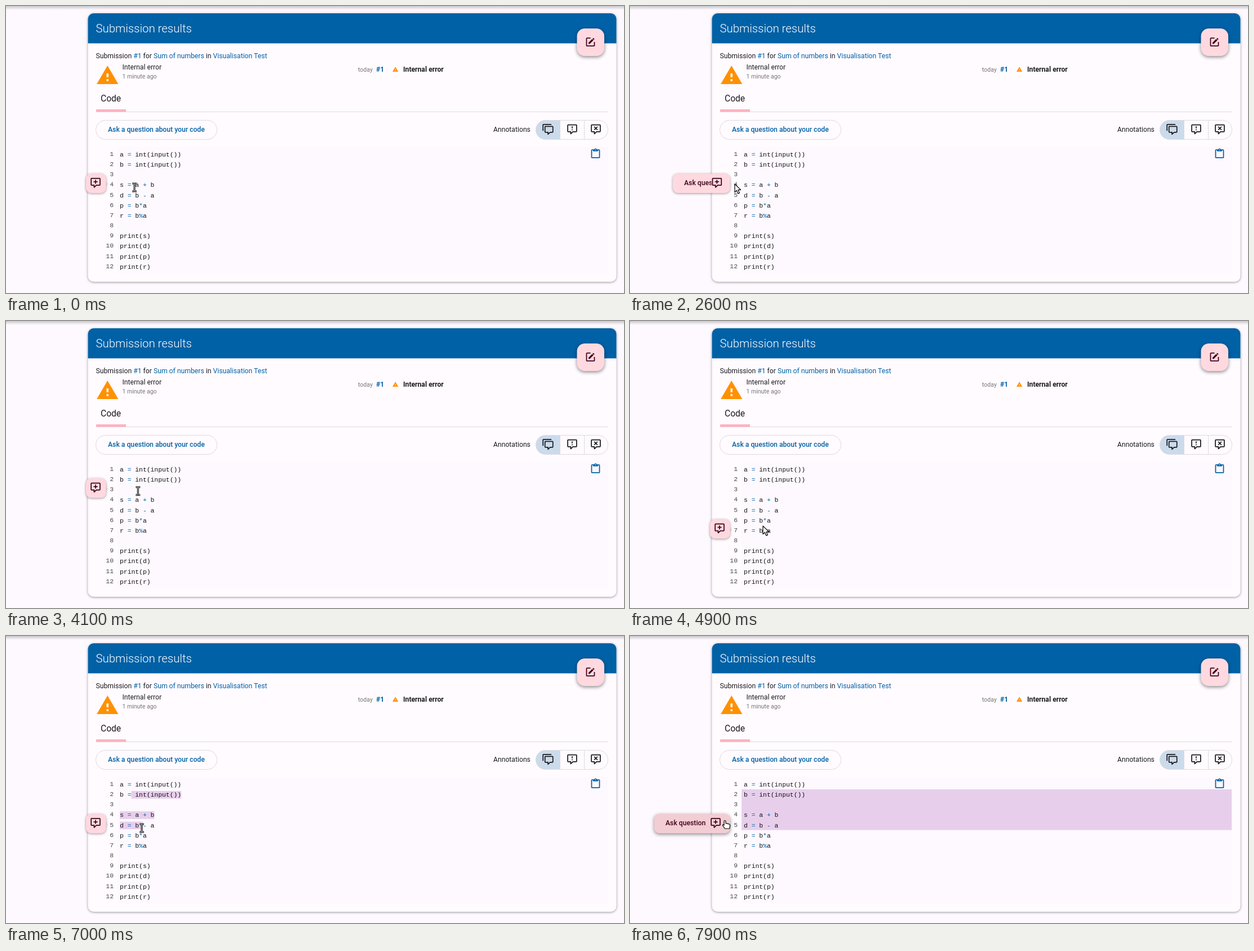
Recreate the animation shown at these times as an HTML page. Size 1097x511 px, loop 8 s.

```html
<!DOCTYPE html>
<html lang="en">
<head>
<meta charset="utf-8">
<title>Submission results</title>
<style>
  html, body { margin: 0; width: 1097px; height: 511px; overflow: hidden; background: #fdf9ff; }
  svg { display: block; }
  text { font: 12.2px Roboto, sans-serif; fill: #1b1b1f; white-space: pre; }
  .title { font-size: 20.4px; font-weight: 300; fill: #fff; }
  .tab { font-size: 15.6px; }
  .small { font-size: 10.5px; fill: #77767a; }
  .link { fill: #0061a6; }
  .medium { font-weight: 500; }
  .bold { font-weight: 700; }
  .code text { font: 11.375px "Liberation Mono", monospace; fill: #111; }
  .code .number { fill: #44474e; text-anchor: end; }
  .outline { fill: none; stroke: #dddae0; }
  .raised { filter: drop-shadow(0 1px 2px #0006); }
  .floating { filter: drop-shadow(0 2px 3px #0007); }
  .maroon { fill: #3f0018; }
  .mark { fill: #e7cfec; }
</style>
</head>
<body>
<svg width="1097" height="511" viewBox="0 0 1097 511">
  <defs>
    <linearGradient id="navShadow" x2="0" y2="1">
      <stop stop-color="#000" stop-opacity=".2"/>
      <stop offset="1" stop-color="#000" stop-opacity="0"/>
    </linearGradient>
    <path id="bubble" d="M9 22a1 1 0 0 1-1-1v-3H4a2 2 0 0 1-2-2V4a2 2 0 0 1 2-2h16a2 2 0 0 1 2 2v12a2 2 0 0 1-2 2h-6.1l-3.7 3.7q-.3.3-.7.3zM10 16v3.1l3.1-3.1H20V4H4v12z"/>
    <path id="warning" fill="#ff9100" d="M13 14h-2v-4h2m0 8h-2v-2h2M1 21h22L12 2z"/>
    <path id="beamShape" d="M-4-7h2.5L0-6l1.5-1H4M-4 7h2.5L0 6l1.5 1H4M0-6V6"/>
  </defs>

  <rect width="1097" height="7" fill="url(#navShadow)"/>
  <rect class="raised" x="145.5" y="13" width="938" height="478" rx="10" fill="#fffbff"/>
  <path fill="#0061a6" d="M145.5 66.5V23a10 10 0 0 1 10-10h918a10 10 0 0 1 10 10v43.5z"/>
  <text class="title" x="159.5" y="47">Submission results</text>

  <rect class="floating" x="1013.5" y="40" width="48.5" height="49" rx="14" fill="#ffd9df"/>
  <path class="maroon" transform="translate(1027 53.5) scale(.875)" d="M5 3a2 2 0 0 0-2 2v14a2 2 0 0 0 2 2h14a2 2 0 0 0 2-2v-7h-2v7H5V5h7V3zm12.8 1q-.3 0-.5.2l-1.2 1.2 2.5 2.5 1.2-1.2q.4-.5 0-1l-1.5-1.5q-.2-.2-.5-.2m-2.4 2.1L8 13.5V16h2.5l7.4-7.4z"/>

  <text x="159.5" y="92.5">Submission <tspan class="link">#1</tspan> for <tspan class="link">Sum of numbers</tspan> in <tspan class="link">Visualisation Test</tspan></text>
  <use href="#warning" transform="translate(159.3 102.5) scale(1.74)"/>
  <text x="206.5" y="113">Internal error</text>
  <text class="small" x="206.5" y="129">1 minute ago</text>
  <text class="small" x="625" y="116.7">today</text>
  <text class="link bold" x="657" y="117">#1</text>
  <use href="#warning" transform="translate(685.6 107.2) scale(.47)"/>
  <text class="bold" x="705" y="117">Internal error</text>

  <text class="tab" x="168" y="170">Code</text>
  <path class="outline" d="M160 188.5h909"/>
  <path fill="#ffb1c1" d="M160 184h53v4.5h-53z"/>

  <rect class="outline" x="159.5" y="203.5" width="215" height="34" rx="17"/>
  <text class="link medium" x="181" y="224">Ask a question about your code</text>
  <text x="865" y="224">Annotations</text>
  <path fill="#cbdbec" d="M983 203.5h-25.5a17 17 0 0 0 0 34H983z"/>
  <rect class="outline" x="940.5" y="203.5" width="128" height="34" rx="17"/>
  <path class="outline" d="M983.5 204v33m43-33v33"/>
  <g fill="#1b1b1f">
    <path transform="translate(951.5 209) scale(.875)" d="M12 23a1 1 0 0 1-1-1v-3H7a2 2 0 0 1-2-2V7a2 2 0 0 1 2-2h14a2 2 0 0 1 2 2v10a2 2 0 0 1-2 2h-4.1l-3.7 3.7q-.3.3-.7.3zM13 17v3.1l3.1-3.1H21V7H7v10zM3 15H1V3a2 2 0 0 1 2-2h16v2H3z"/>
    <g transform="translate(994.5 209) scale(.875)"><use href="#bubble"/><path d="M11 6h2v4h-2zm0 6h2v2h-2z"/></g>
    <g transform="translate(1036.5 209) scale(.875)"><use href="#bubble"/><path d="M9.4 6 12 8.6 14.6 6 16 7.4 13.4 10l2.6 2.6-1.4 1.4-2.6-2.6L9.4 14 8 12.6l2.6-2.6L8 7.4z"/></g>
  </g>

  <rect x="198" y="251" width="871" height="225" fill="#fdf9fe"/>
  <path id="marks" class="mark"/>
  <path class="link" transform="translate(1036 252.6) scale(.875)" d="M19 3h-4.2a3 3 0 0 0-5.6 0H5a2 2 0 0 0-2 2v14a2 2 0 0 0 2 2h14a2 2 0 0 0 2-2V5a2 2 0 0 0-2-2m-7 0a1 1 0 0 1 0 2 1 1 0 0 1 0-2M7 7h10V5h2v14H5V5h2z"/>
  <g id="code" class="code"></g>

  <g id="ask">
    <path id="tail" fill="#ffe3e8" d="M176-4l5.5 6-5.5 6z"/>
    <rect id="pill" y="-16.5" height="34.5" rx="9"/>
    <svg id="label" y="-12" height="24"><text class="maroon medium" x="0" y="16">Ask question</text></svg>
    <g id="plus" class="maroon"><use href="#bubble"/><path d="M11 6h2v3h3v2h-3v3h-2v-3H8V9h3z"/></g>
  </g>

  <g id="cursor" stroke="#000" stroke-width="1.2" stroke-linejoin="round" fill="#fff">
    <g id="beam" fill="none">
      <use href="#beamShape" stroke-width="3"/>
      <use href="#beamShape" stroke-width=".9" stroke="#fff"/>
    </g>
    <path id="arrow" d="M0 0v14.5l3.4-3.1 2.4 5.7 2.6-1.1L6 10.4h4.6z"/>
    <path id="hand" d="M-4-6a1.5 1.5 0 0 1 3 0v3.6h1.2l4.8 1.2q1.6.5 1.5 2V3l-1 4h-8L-6.2 1.6q-.8-1.6.6-1.8L-4 .9z"/>
  </g>
</svg>
<script>
const $ = id => document.getElementById(id);
const LOOP = 8000, STEP = 100;
const TOP = 255, ROW = 18.15, LEFT = 202, CHAR = 6.825;
const DRAG_START = 6100, DRAG_END = 7000;
const lines = ['a = int(input())', 'b = int(input())', '', 's = a + b', 'd = b - a', 'p = b*a',
  'r = b%a', '', 'print(s)', 'print(d)', 'print(p)', 'print(r)'];

$('code').innerHTML = lines.map((line, i) => {
  const y = TOP + 12 + i * ROW;
  const code = line.replace(/[=+*%-]/g, '<tspan class="link">$&</tspan>');
  return `<text class="number" x="191" y="${y}">${i + 1}</text><text x="${LEFT}" y="${y + 1}">${code}</text>`;
}).join('');

// Mouse strokes: start and end time, then where each one ends
const strokes = [
  [200, 1000, 179, 320], [1100, 1400, 168, 316],   // onto the button
  [1900, 2100, 203, 318], [2100, 2200, 172, 316],  // off and back on
  [2500, 2900, 228, 320], [3200, 3700, 236, 262],  // through the code
  [3800, 4500, 232, 357], [4700, 4900, 236, 365],
  [4900, 5200, 267, 330], [5200, 5600, 225, 282], [5600, 5800, 221, 280],
  [DRAG_START, 6700, 241, 342], [7600, 7900, 171, 336],
];

function mouse(t) {
  let x = 228, y = 323;
  for (const [start, end, toX, toY] of strokes) {
    const f = Math.min(1, Math.max(0, (t - start) / (end - start)));
    x += (toX - x) * f;
    y += (toY - y) * f;
  }
  return { x, y };
}

const hovering = t => mouse(t).x < 178;

// The button takes three steps to unfold or fold.
function unfolded(t) {
  const wanted = [0, 1, 2].filter(i => hovering(t - i * STEP) || t - i * STEP > DRAG_END);
  return wanted.length / 3;
}

function set(id, attributes) {
  for (const name in attributes) $(id).setAttribute(name, attributes[name]);
}

function marks(t, x, lastRow) {
  if (t <= DRAG_START) return '';
  if (t > DRAG_END) return 'M198 273h870v72.5h-870z';
  let d = '';
  for (let row = 1; row <= lastRow; row++) {
    const from = row === 1 ? 3 : 0, length = lines[row].length;
    const to = row === lastRow ? Math.min(length, Math.round((x - LEFT) / CHAR)) : length;
    const start = LEFT + from * CHAR;
    if (to > from) d += `M${start} ${TOP + 2.8 + row * ROW}h${(to - from) * CHAR}v13.5H${start}z`;
  }
  return d;
}

function draw(time) {
  const t = Math.floor(time % LOOP / STEP) * STEP;
  const { x, y } = mouse(t), open = unfolded(t), hover = hovering(t);
  const row = Math.floor((y - TOP) / ROW), inRow = y - TOP - row * ROW;
  const dragging = t >= DRAG_START && t <= DRAG_END;
  const betweenLines = !dragging && (inRow < 2 || inRow > 16.2);
  const shape = hover ? 'hand' : x < 199 || betweenLines ? 'arrow' : 'beam';
  const left = 142 - 99 * open;

  set('marks', { d: marks(t, x, row) });
  set('ask', { transform: `translate(0 ${315 + (row - 3) * ROW})` });
  set('pill', { x: left, width: 177.5 - left, fill: hover ? '#f2cdd3' : '#ffd9df', class: hover ? 'floating' : 'raised' });
  set('tail', { opacity: 1 - open });
  set('label', { x: left + 20, width: 73 * open });
  set('plus', { transform: `translate(${148.5 - 7 * open} -10.8) scale(.875)` });
  set('cursor', { transform: `translate(${x} ${y})` });
  for (const id of ['beam', 'arrow', 'hand']) set(id, { display: id === shape ? 'inline' : 'none' });
}

function loop() {
  draw(performance.now());
  requestAnimationFrame(loop);
}
loop();
</script>
</body>
</html>
```
